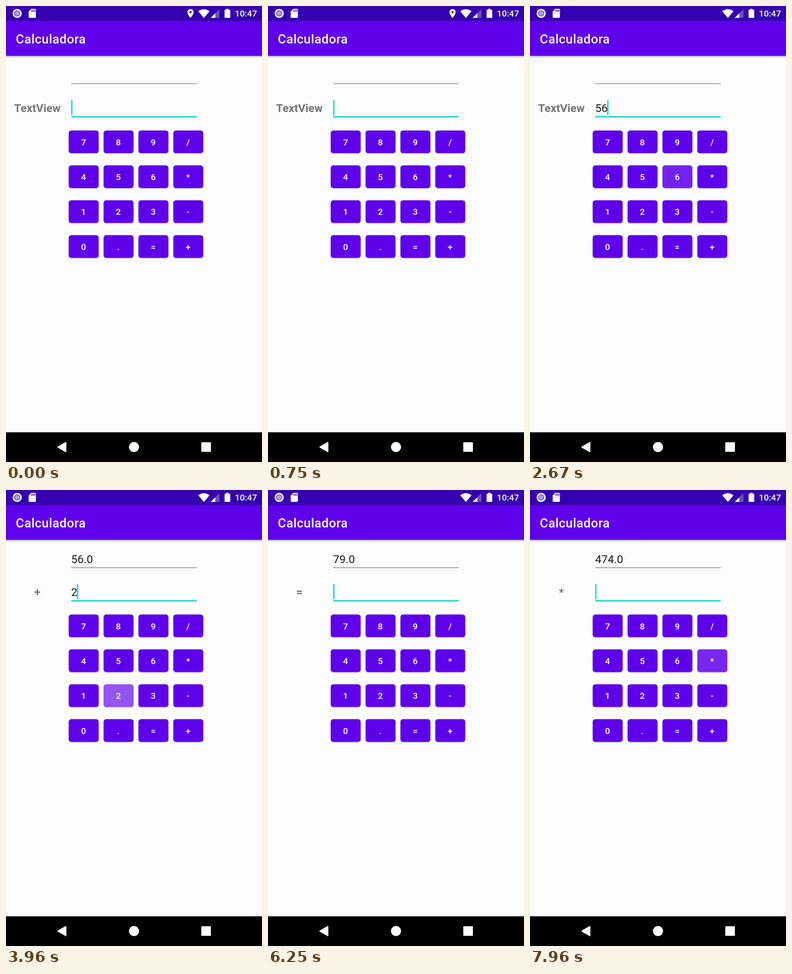
Write an HTML page that moves like this. It is 561 px wide and 998 px high and loops after 8000 ms.

```html
<!DOCTYPE html>
<html lang="es">
<head>
<meta charset="utf-8">
<title>Calculadora</title>
<style>
  html, body { margin: 0; width: 100%; height: 100%; overflow: hidden; background: #fcfcfd; }
  svg { display: block; width: 100vw; height: 100vh; }
  text { font-family: Roboto, sans-serif; }
  .medium { font-weight: 500; fill: #fff; }
  .field { font-size: 24.5px; fill: #1c1c1c; }
  #op { font-size: 24.5px; font-weight: 700; fill: #757575; text-anchor: middle; }
  .key text { font-size: 19.1px; text-anchor: middle; }
  .key > rect { filter: drop-shadow(0 1.5px 1.3px rgba(0, 0, 0, .28)); }
</style>
</head>
<body>
<svg id="stage" viewBox="0 0 561 998">
  <defs>
    <linearGradient id="shade" x2="0" y2="1">
      <stop offset="0" stop-color="#000" stop-opacity=".3"/>
      <stop offset=".4" stop-color="#000" stop-opacity=".1"/>
      <stop offset="1" stop-color="#000" stop-opacity="0"/>
    </linearGradient>
    <clipPath id="face"><rect width="65.5" height="49.6" rx="5.5"/></clipPath>
  </defs>
  <rect width="561" height="998" fill="#fcfcfd"/>

  <rect y="109" width="561" height="7" fill="url(#shade)"/>
  <rect y="32" width="561" height="77" fill="#5f00eb"/>
  <rect width="561" height="32.7" fill="#3500ad"/>
  <text class="medium" x="21.6" y="81.5" font-size="27.6" letter-spacing=".55">Calculadora</text>

  <g fill="#fff">
    <circle cx="24.5" cy="16.3" r="10"/>
    <circle cx="24.5" cy="16.3" r="6.8" fill="#6a48bf"/>
    <circle cx="24.5" cy="16.3" r="5" fill="#b4a2e0"/>
    <path d="M55.5 6.3H63.5Q65.5 6.3 65.5 8.3V24Q65.5 26 63.5 26H51.7Q49.7 26 49.7 24V12.2Z"/>
    <path d="M56.6 8.6V12.6M59.8 8.6V12.6M63 8.6V12.6" stroke="#3500ad" stroke-width="1.8"/>
    <path id="pin" fill-rule="evenodd" d="M404.4 6.7A6.8 6.8 0 0 0 397.6 13.5C397.6 18.5 404.4 26.2 404.4 26.2S411.2 18.5 411.2 13.5A6.8 6.8 0 0 0 404.4 6.7ZM404.4 11.1A2.4 2.4 0 1 1 404.4 15.9A2.4 2.4 0 1 1 404.4 11.1Z"/>
    <path d="M421.3 11.4Q433.5 2.4 446 11.4L433.6 26.3Z"/>
    <path d="M448.6 26L467.6 7V26Z" opacity=".3"/>
    <path d="M448.6 26L458.6 16V26Z"/>
    <path d="M482.2 8.2V6.3H487.8V8.2H490.2Q491.4 8.2 491.4 9.4V24.8Q491.4 26 490.2 26H480.2Q479 26 479 24.8V9.4Q479 8.2 480.2 8.2Z"/>
  </g>
  <text class="medium" x="501.6" y="23.4" font-size="19.1">10:47</text>

  <path d="M143 170H418" stroke="#858585" stroke-width="1.4"/>
  <path d="M143 242.6H418" stroke="#08d8c5" stroke-width="2.7"/>
  <text id="total" class="field" x="142.8" y="159.8"></text>
  <text id="entry" class="field" x="142.8" y="232"></text>
  <text id="op" x="68.8" y="232"></text>
  <rect id="caret" y="206" width="2.7" height="33" fill="#08d8c5"/>
  <g id="keys"></g>

  <rect y="933" width="561" height="65" fill="#000"/>
  <g fill="#fff" stroke="#fff" stroke-linejoin="round">
    <path d="M114 965.4L131 955.6V975.2Z" stroke-width="2.6"/>
    <circle cx="280.5" cy="965.3" r="11" stroke="none"/>
    <path d="M429 955.8H448V974.8H429Z" stroke-width="2"/>
  </g>
</svg>
<script>
const LOOP = 8000, BLINK = 500, PIN_OFF = 2000;
const CLICK = 90;
const RIPPLE = { rise: 75, hold: 160, end: 310, alpha: .33 };
const DIGIT = 13.76;

// press time, key, then the screen after the click
const presses = [
  [1900, '5', '', 'TextView', '5'],
  [2420, '6', '', 'TextView', '56'],
  [3100, '+', '56.0', '+', ''],
  [3800, '2', '56.0', '+', '2'],
  [4300, '3', '56.0', '+', '23'],
  [5150, '=', '79.0', '=', ''],
  [6960, '*', '79.0', '*', ''],
  [7340, '6', '79.0', '*', '6'],
  [7720, '*', '474.0', '*', '']
].map(([down, key, total, op, entry]) => ({ down, key, total, op, entry }));
const idle = { down: -370 - CLICK, total: '', op: 'TextView', entry: '' };

const $ = id => document.getElementById(id);
const clamp = v => Math.min(1, Math.max(0, v));
const setText = (el, s) => { if (el.textContent !== s) el.textContent = s; };

$('keys').innerHTML = [...'789/456*123-0.=+'].map((label, i) => {
  const x = 137.5 + i % 4 * 76.4, y = 272.4 + Math.floor(i / 4) * 76.4;
  return `<g class="key" data-key="${label}" transform="translate(${x} ${y})">
    <rect width="65.5" height="49.6" rx="5.5" fill="#5f00eb"/>
    <g clip-path="url(#face)"><circle cx="32.7" cy="24.8" r="0" fill="#fff"/></g>
    <text class="medium" x="32.4" y="32.2">${label}</text></g>`;
}).join('');

const ripples = {};
document.querySelectorAll('.key').forEach(k => {
  ripples[k.dataset.key] = k.querySelector('circle');
});

function drawRipples(t) {
  for (const c of Object.values(ripples)) c.setAttribute('opacity', 0);
  for (const { down, key } of presses) {
    const age = t - down;
    if (age < 0 || age > RIPPLE.end) continue;
    const fade = 1 - clamp((age - RIPPLE.hold) / (RIPPLE.end - RIPPLE.hold));
    const grow = 1 - (1 - clamp(age / 150)) ** 2;
    ripples[key].setAttribute('r', 18 + 24 * grow);
    ripples[key].setAttribute('opacity', RIPPLE.alpha * clamp(age / RIPPLE.rise) * fade);
  }
}

function draw(t) {
  const now = presses.filter(p => t >= p.down + CLICK).pop() || idle;
  setText($('total'), now.total);
  setText($('op'), now.op);
  setText($('entry'), now.entry);

  const phase = Math.floor((t - now.down - CLICK) / BLINK);
  $('caret').setAttribute('x', Math.max(142.9, 141.7 + now.entry.length * DIGIT));
  $('caret').setAttribute('opacity', phase % 2 ? 0 : 1);
  $('pin').setAttribute('opacity', t < PIN_OFF ? 1 : 0);
  drawRipples(t);
}

const start = performance.now();
function tick() {
  draw((performance.now() - start) % LOOP);
  requestAnimationFrame(tick);
}
tick();
</script>
</body>
</html>
```
